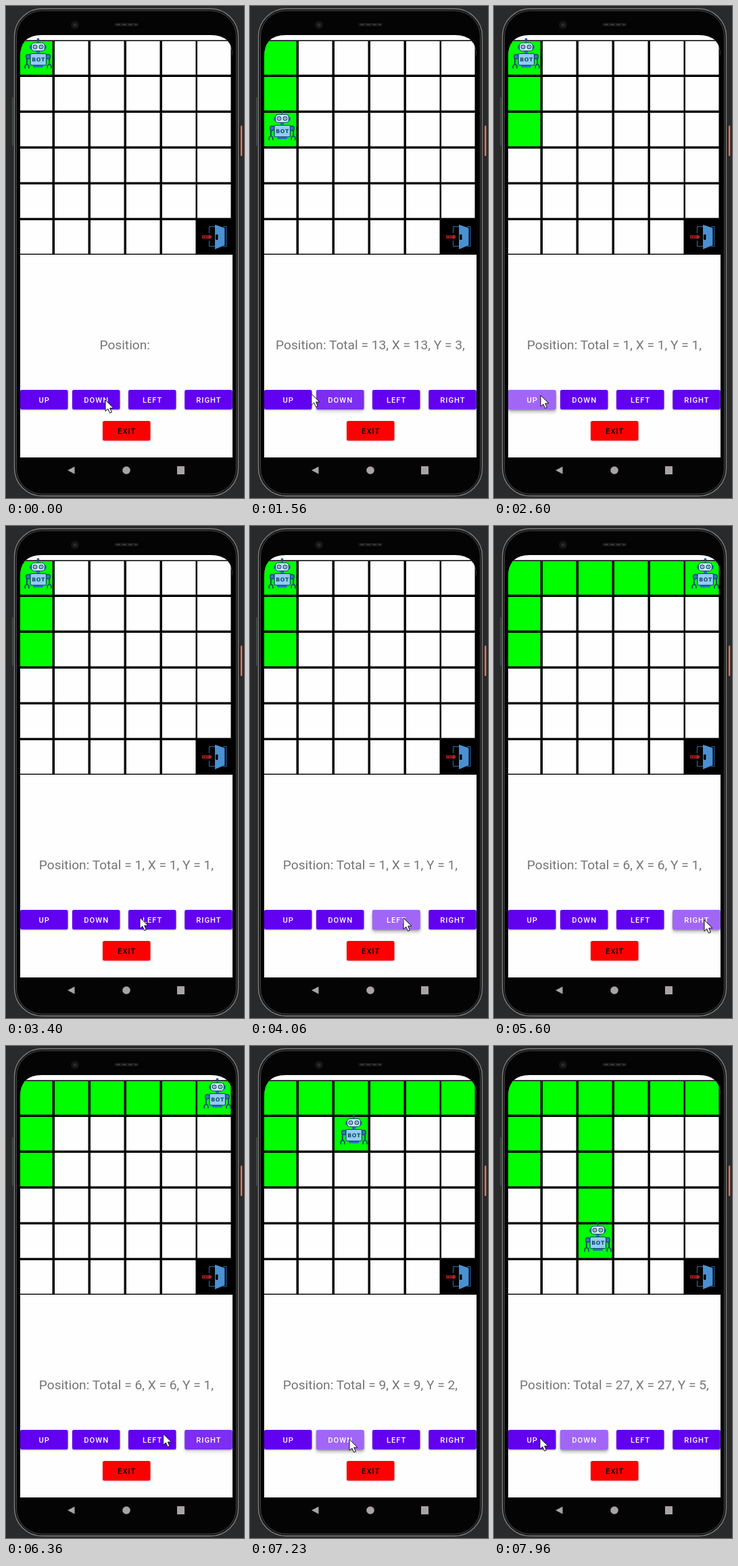
Write an HTML page that moves like this. It is 352 by 728 pixels and loops after 8000 ms.

```html
<!DOCTYPE html>
<html lang="en">
<head>
<meta charset="utf-8">
<title>Robot grid</title>
<style>
  html, body { margin: 0; width: 100%; height: 100%; overflow: hidden; background: #282a2b; }
  svg { display: block; width: 352px; height: 728px; }
  text { font-family: Roboto, sans-serif; text-anchor: middle; }
  .label { font-size: 11.2px; font-weight: 500; letter-spacing: 1px; fill: #fff; }
  .status { font-size: 19.15px; fill: #757575; }
  .rest { filter: url(#soft); fill: #000; opacity: .3; }
  .lift { filter: url(#wide); fill: #000; }
  .ink { stroke: #15466f; stroke-width: 1.2; }
</style>
</head>
<body>
<svg viewBox="0 0 352 728">
  <defs>
    <clipPath id="screen"><path d="M21 668V75Q21 43 53 43H303Q335 43 335 75V668Z"/></clipPath>
    <filter id="soft" x="-20%" y="-40%" width="140%" height="180%"><feGaussianBlur stdDeviation=".9"/></filter>
    <filter id="wide" x="-20%" y="-60%" width="140%" height="220%"><feGaussianBlur stdDeviation="2.6"/></filter>
  </defs>

  <!-- phone -->
  <rect x="9" y="135" width="2" height="72" fill="#414744"/>
  <rect x="347" y="177" width="2.4" height="45" rx="1" fill="#e2745a"/>
  <rect x="12.5" y="4" width="331" height="721" rx="41" fill="#161617" stroke="#7d7d7d" stroke-width="1.4"/>
  <rect x="15.5" y="7" width="325" height="715" rx="38" fill="#040405" stroke="#444445"/>
  <circle cx="102" cy="28" r="6" fill="#151517"/>
  <circle cx="102" cy="28" r="2.5" fill="#2c2c2f"/>
  <rect x="160" y="25" width="36" height="5" rx="2.5" fill="#151515"/>
  <path d="M163 27.5H194" stroke="#3a3a3a" stroke-width="2" stroke-dasharray="6 3"/>
  <g fill="#a7a3a7">
    <path d="M91 687L101.5 681.5V692.5Z"/>
    <circle cx="178" cy="687" r="5.8"/>
    <rect x="253" y="681" width="11" height="12"/>
  </g>

  <g clip-path="url(#screen)">
    <rect x="21" y="43" width="314" height="625" fill="#fefefe"/>
    <rect x="21" y="50.5" width="314" height="317.5"/>
    <g id="cells"></g>

    <!-- exit door -->
    <path d="M309 326.5H300.5V336M300.5 347V355.5H309M321 326.5H326V355.5H321" fill="none" stroke="#2d6fb0"/>
    <path d="M309 323.5L323.5 328.5V354L309 360Z" fill="#4a90d2"/>
    <rect x="310" y="338" width="3.5" height="8" rx="1"/>
    <rect x="290" y="339.3" width="11" height="4.6" fill="#b9232b"/>
    <path d="M300.5 337.8L305 341.6L300.5 345.4Z" fill="#b9232b"/>
    <text x="295.6" y="343.2" font-size="4.4" font-weight="700" fill="#18070a">EXIT</text>

    <!-- robot, drawn in the first cell -->
    <g id="bot">
      <path d="M47.5 50V55" class="ink"/>
      <circle cx="47.5" cy="49.3" r="1.8" fill="#1d5b94"/>
      <rect x="35" y="58" width="25" height="6" rx="2" fill="#2773ad"/>
      <rect x="37.5" y="54.5" width="20" height="12" rx="4.5" fill="#c6e5f3" class="ink"/>
      <g fill="#fff" class="ink"><circle cx="43" cy="60.5" r="2.7"/><circle cx="52" cy="60.5" r="2.7"/></g>
      <g fill="#15466f"><circle cx="43" cy="60.5" r=".9"/><circle cx="52" cy="60.5" r=".9"/></g>
      <rect x="45" y="67" width="5" height="4" fill="#2773ad"/>
      <g fill="none" stroke="#15466f" stroke-width="2"><path d="M30.8 77V87M64.2 77V87"/></g>
      <g fill="#3578aa" class="ink"><circle cx="32.8" cy="75" r="3.3"/><circle cx="62.2" cy="75" r="3.3"/></g>
      <g fill="none" stroke="#15466f" stroke-width="1.6"><path d="M28.2 92.5V88.5Q31 84.5 33.8 88.5V92.5M61.2 92.5V88.5Q64 84.5 66.8 88.5V92.5"/></g>
      <rect x="40" y="87" width="15" height="4" rx="1" fill="#2773ad"/>
      <rect x="36" y="70.5" width="23.5" height="17" rx="1.5" fill="#8fcdf2" class="ink"/>
      <text x="48" y="82" font-size="7.8" font-weight="700" letter-spacing=".6" fill="#15466f" style="font-family:'DejaVu Sans',sans-serif">BOT</text>
    </g>

    <text id="status" class="status" y="508.4"></text>
    <g id="buttons"></g>
  </g>

  <path id="cursor" d="M0 0V16.5L3.8 13L6.6 19.3L9.4 18.1L6.7 12H12Z" fill="#fff" stroke="#111" stroke-width="1"/>
</svg>

<script>
const LOOP = 8000, DELAY = 65;
const $ = id => document.getElementById(id);
const NS = 'http://www.w3.org/2000/svg';

function add(parent, tag, attrs, text = '') {
  const el = document.createElementNS(NS, tag);
  for (const k in attrs) el.setAttribute(k, attrs[k]);
  el.textContent = text;
  return parent.appendChild(el);
}

const cells = Array.from({ length: 36 }, (_, i) => add($('cells'), 'rect', {
  x: Math.round(19.4 + 52.8 * (i % 6)), y: Math.round(52 + 52.9 * Math.floor(i / 6)),
  width: 49.5, height: 49.6, fill: i === 35 ? '#000' : '#fefefe'
}));

function makeButton(name, x, y, color, ink) {
  const box = { x, y, width: 70.5, height: 29, rx: 2.5 };
  const g = $('buttons');
  const lift = add(g, 'rect', { ...box, y: y + 4, class: 'lift', opacity: 0 });
  add(g, 'rect', { ...box, y: y + 1, class: 'rest' });
  add(g, 'rect', { ...box, fill: color });
  const glow = add(g, 'rect', { ...box, fill: '#fff', opacity: 0 });
  add(g, 'text', { x: x + 35.7, y: y + 18.7, class: 'label', style: `fill:${ink}` }, name);
  return { lift, glow };
}

// step in columns and rows, then press times
const controls = [
  { name: 'UP', x: 21, step: [0, -1], at: [2120, 2460, 2760] },
  { name: 'DOWN', x: 98, step: [0, 1], at: [800, 1310, 7120, 7360, 7600, 7860] },
  { name: 'LEFT', x: 181, step: [-1, 0], at: [3720, 3900, 6460, 6640, 6820] },
  { name: 'RIGHT', x: 264.3, step: [1, 0], at: [4555, 4735, 4915, 5095, 5275, 5500, 5800, 6110] }
];
for (const c of controls) Object.assign(c, makeButton(c.name, c.x, 568, '#6200f0', '#fff'));
makeButton('EXIT', 143, 614, '#fe0000', '#000');

const presses = controls.flatMap(c => c.at.map(t => ({ t, step: c.step })))
  .sort((a, b) => a.t - b.t);

// time, x, y of the pointer tip
const path = [
  [0, 147, 583], [1400, 147, 583], [1560, 91, 574], [1700, 69, 576],
  [2960, 69, 576], [3500, 227, 580], [4260, 227, 580], [4520, 311, 583],
  [6150, 311, 583], [6340, 232.6, 574], [6900, 232.6, 574], [7080, 147, 582],
  [7890, 147, 582], [7955, 68, 580], [LOOP, 68, 580]
];

const clamp = (v, lo, hi) => Math.min(hi, Math.max(lo, v));

function glowAt(times, t) {
  return Math.max(...times.map(p => {
    const age = t - p;
    return age < 0 ? 0 : clamp(Math.min(age / 60, (300 - age) / 110), 0, 1);
  }));
}

function pointerAt(t) {
  const i = path.findIndex(k => k[0] > t);
  const [t0, x0, y0] = path[i - 1], [t1, x1, y1] = path[i];
  const u = (t - t0) / (t1 - t0);
  return [x0 + (x1 - x0) * u, y0 + (y1 - y0) * u];
}

function draw(t) {
  let col = 0, row = 0, moved = false;
  const seen = new Set([0]);
  for (const p of presses) {
    if (t < p.t + DELAY) break;
    col = clamp(col + p.step[0], 0, 5);
    row = clamp(row + p.step[1], 0, 5);
    seen.add(row * 6 + col);
    moved = true;
  }
  cells.forEach((c, i) => {
    if (i < 35) c.setAttribute('fill', seen.has(i) ? '#00fe00' : '#fefefe');
  });
  $('bot').setAttribute('transform', `translate(${53 * col} ${53 * row})`);

  const n = row * 6 + col + 1;
  $('status').textContent = moved ? `Position: Total = ${n}, X = ${n}, Y = ${row + 1},` : 'Position:';
  $('status').setAttribute('x', moved ? 177.9 : 175.7);

  for (const c of controls) {
    const g = glowAt(c.at, t);
    c.glow.setAttribute('opacity', 0.4 * g);
    c.lift.setAttribute('opacity', 0.25 * g);
  }
  $('cursor').setAttribute('transform', `translate(${pointerAt(t)})`);
}

function tick() {
  draw(performance.now() % LOOP);
  requestAnimationFrame(tick);
}
tick();
</script>
</body>
</html>
```
